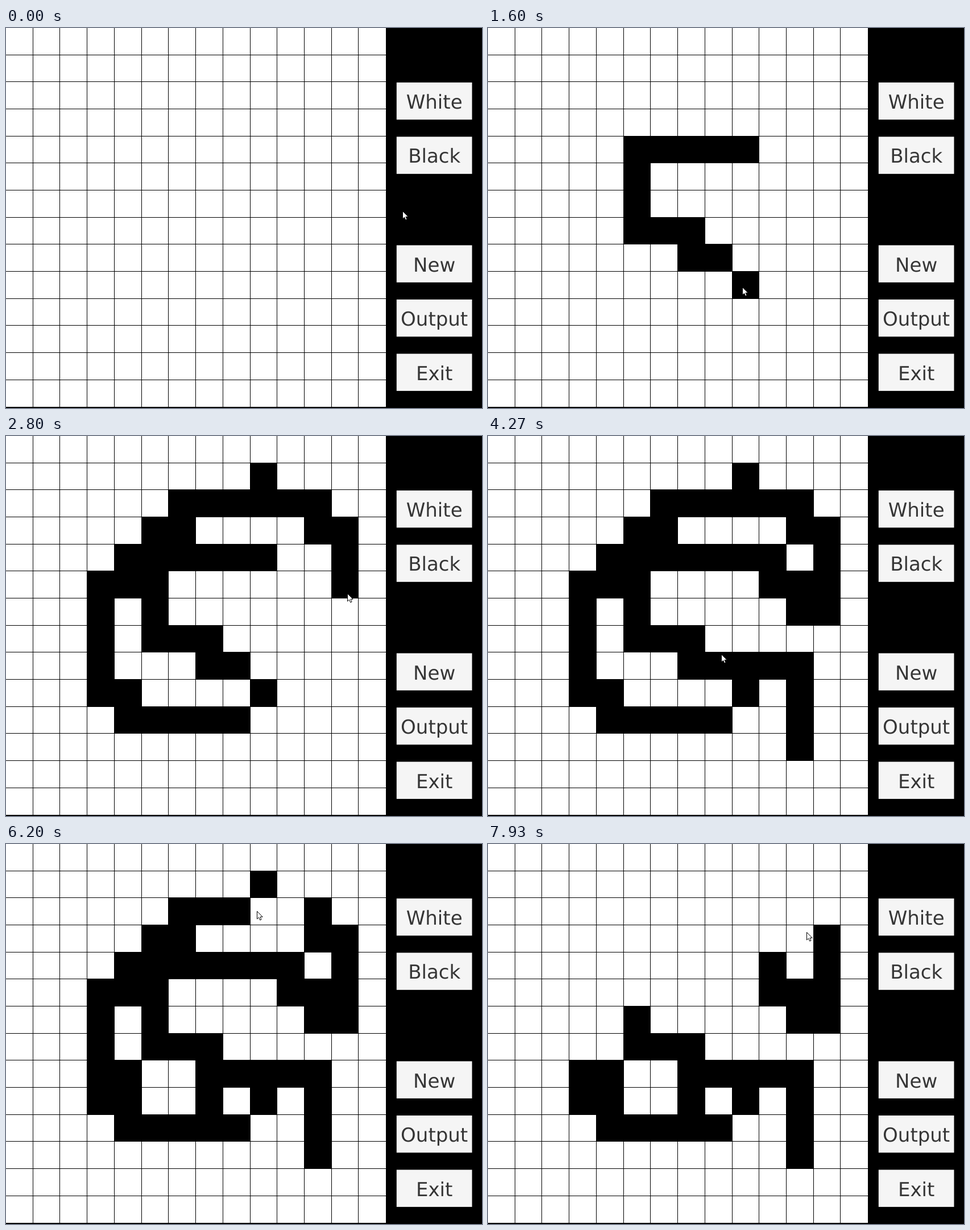
Write an HTML page that moves like this. It is 837 px wide and 669 px high and loops after 8000 ms.

```html
<!DOCTYPE html>
<html lang="en">
<head>
<meta charset="utf-8">
<title>Grid painter</title>
<style>
  html, body { margin: 0; width: 100%; height: 100%; overflow: hidden; background: #000; }
  svg { display: block; width: 837px; height: 669px; }
  text {
    font: 34px "DejaVu Sans", sans-serif; fill: #363636;
    text-anchor: middle; text-rendering: geometricPrecision;
  }
</style>
</head>
<body>
<svg id="stage" viewBox="0 0 837 669">
  <rect width="668" height="667" fill="#fff"/>
  <path id="cells" shape-rendering="crispEdges"/>
  <path id="lines" shape-rendering="crispEdges"/>
  <g id="buttons"></g>
  <path id="pointer" d="M-.5 .5V14L2.6 11.2L4.7 16L7 15L5 10.3H9.2Z" fill="#fff" stroke="#000"/>
</svg>
<script>
const LOOP = 8000, FPS = 15, COUNT = 14, SIZE = 668;
const el = id => document.getElementById(id);
const box = (x, y, w, h) => `M${x} ${y}h${w}v${h}h${-w}z`;

// Pixel of the k-th grid line on each axis
const lineX = k => Math.max(0, Math.floor(k * 47.745 - .704));
const lineY = k => Math.max(0, Math.floor(k * 47.667 - .5));

let grid = '';
for (let k = 1; k < COUNT; k++) {
  grid += box(lineX(k), 0, 1, SIZE) + box(0, lineY(k), SIZE, 1);
}
el('lines').setAttribute('d', grid);

// Buttons sit in evenly spaced slots; an empty label leaves a gap
const BTN = { x: 686.8, w: 132.7, h: 65.4 };
const buttons = {};
['White', 'Black', '', 'New', 'Output', 'Exit'].forEach((label, slot) => {
  if (!label) return;
  const y = 95.9 + slot * 95.52;
  const add = (tag, attrs) => {
    const node = document.createElementNS('http://www.w3.org/2000/svg', tag);
    for (const key in attrs) node.setAttribute(key, attrs[key]);
    return el('buttons').appendChild(node);
  };
  const face = add('rect', { x: BTN.x, y, width: BTN.w, height: BTN.h });
  add('text', { x: BTN.x + BTN.w / 2, y: y + 46.05 }).textContent = label;
  buttons[label] = { y, face };
});

// Timeline, measured in ticks of 1/15 s
const track = [], paints = [], clicks = [];
const glide = (n, x, y) => track.push({ n, x, y });

function press(from, to, label) {
  const x = BTN.x + BTN.w / 2, y = buttons[label].y + BTN.h / 2;
  glide(from, x, y);
  glide(to, x, y);
  clicks.push({ from, to });
}

// Paints along compass runs such as "w4 s se", starting at one cell
function stroke(from, to, ink, col, row, runs = '') {
  const cells = [[col, row]];
  for (const [, dir, times] of runs.matchAll(/([nsew]+)(\d*)/g)) {
    for (let i = 0; i < (times || 1); i++) {
      col += dir.includes('e') - dir.includes('w');
      row += dir.includes('s') - dir.includes('n');
      cells.push([col, row]);
    }
  }
  const gap = (to - from) / Math.max(1, cells.length - 1);
  cells.forEach(([c, r], i) => {
    const n = from + gap * i;
    paints.push({ n, ink, col: c, row: r });
    glide(n, (lineX(c) + lineX(c + 1)) / 2, (lineY(r) + lineY(r + 1)) / 2);
  });
}

glide(0, 698, 322);
glide(3, 825, 290);
press(7, 9, 'Black');
stroke(13.4, 24.8, 1, 9, 4, 'w4 s3 e2 s e se sw');
stroke(26, 39, 1, 8, 10, 'w4 n w n4 e n e n e n e3 n se e s');
stroke(40, 41.4, 1, 12, 3, 's2');
glide(42, 601, 277);
stroke(43, 51, 1, 12, 6, 'w n w n w3');
glide(52, 330, 216);
stroke(58.6, 63.6, 1, 11, 11, 'n3 w3');
glide(64, 411, 384);
stroke(66, 72, 1, 7, 9, 's w3 n2');
glide(78, 753, 223);
glide(79, 745, 223);
glide(81, 745, 223);
press(84, 86.5, 'White');
stroke(92, 101, 0, 10, 2, 'w4 s w se w2 s w');
stroke(104, 104, 0, 9, 1);
glide(107, 523, 88);
glide(110, 559, 86);
stroke(111, 112, 0, 11, 2, 's');
stroke(113, 116.6, 0, 9, 4, 'w2 sw w sw w s');
glide(117.2, 102, 350);
glide(119, 561, 155);

function pointerAt(n) {
  const i = track.findIndex(key => key.n > n);
  if (i < 0) return track[track.length - 1];
  const a = track[i - 1], b = track[i];
  const f = (n - a.n) / (b.n - a.n);
  return { x: a.x + (b.x - a.x) * f, y: a.y + (b.y - a.y) * f };
}

function draw(time) {
  const n = Math.floor((time % LOOP + 3.4) * FPS / 1000) % (LOOP * FPS / 1000);

  const latest = new Map();
  for (const p of paints) {
    if (p.n <= n) latest.set(p.col + ',' + p.row, p);
  }
  let d = '';
  for (const { ink, col, row } of latest.values()) {
    if (!ink) continue;
    const x = lineX(col), y = lineY(row);
    d += box(x, y, lineX(col + 1) - x, lineY(row + 1) - y);
  }
  el('cells').setAttribute('d', d);

  const p = pointerAt(n);
  el('pointer').setAttribute('transform', `translate(${Math.round(p.x)} ${Math.round(p.y)})`);

  const down = clicks.some(c => n >= c.from && n <= c.to);
  for (const { y, face } of Object.values(buttons)) {
    const over = p.x >= BTN.x && p.x < BTN.x + BTN.w && p.y >= y && p.y < y + BTN.h;
    face.setAttribute('fill', !over ? '#f5f5f5' : down ? '#c8c8c8' : '#ebebeb');
  }
}

const start = performance.now();
function loop() {
  draw(performance.now() - start);
  requestAnimationFrame(loop);
}
loop();
</script>
</body>
</html>
```
